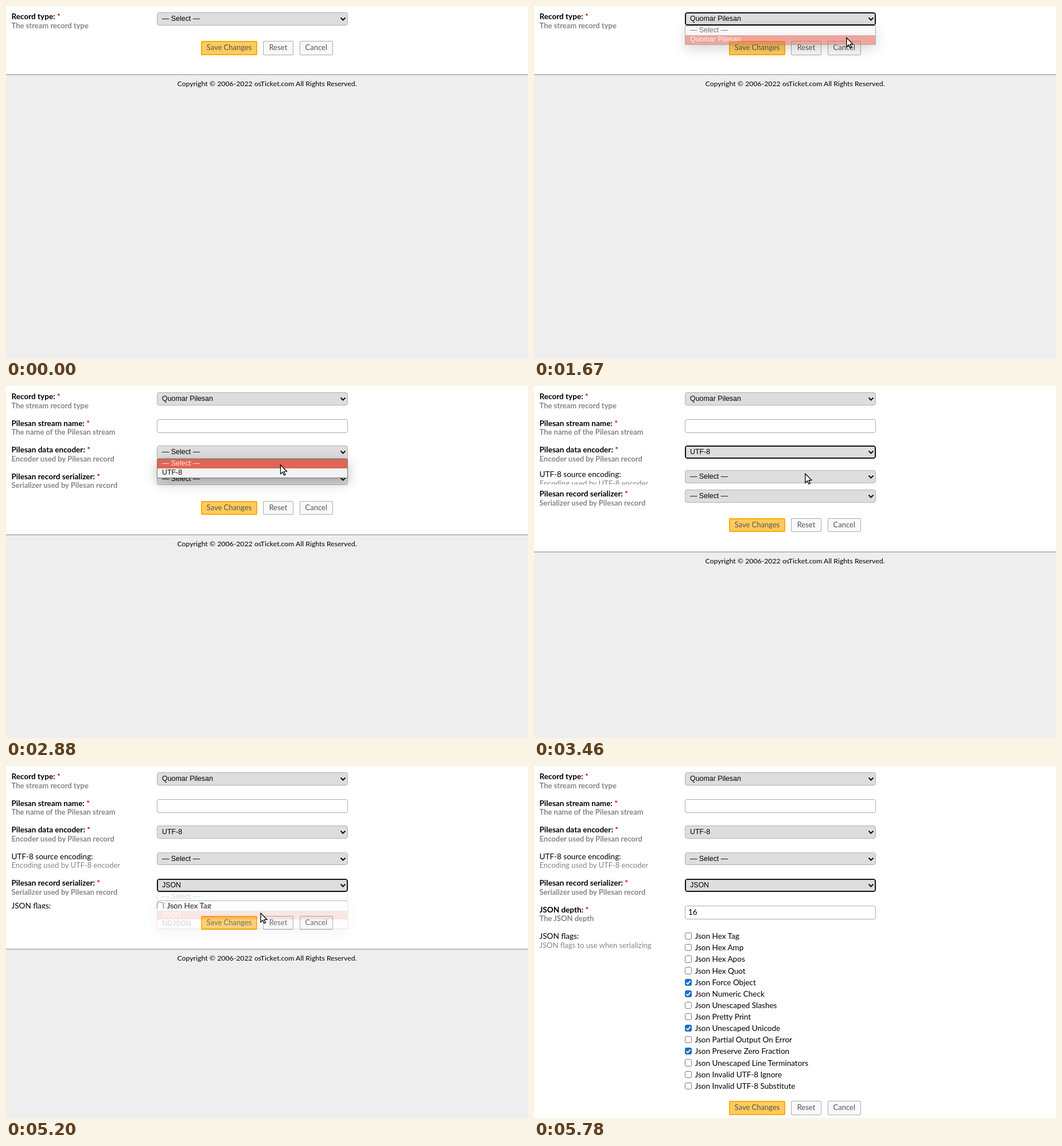
An HTML page that plays this animation: 910 px wide and 615 px high, repeating every 9.64 s.

```html
<!DOCTYPE html>
<html lang="en">
<head>
<meta charset="utf-8">
<title>Stream record form</title>
<style>
html, body { margin: 0; width: 100%; height: 100%; overflow: hidden; background: #eee; }
body { position: relative; font: 13.55px/16.4px Lato, sans-serif; color: #000; }
div, span, svg { position: absolute; box-sizing: border-box; white-space: nowrap; }
#form { left: 0; top: 0; width: 910px; background: #fff; }
.row { left: 0; width: 910px; overflow: hidden; }
.label { left: 9.5px; top: -1.3px; }
.label i { color: #d00; font-style: normal; }
.hint { left: 9.5px; top: 14.5px; font-size: 13px; color: #868686; }
.bold { font-weight: bold; }
.select, .input { left: 263px; width: 332.5px; border: 1px solid #aaa; border-radius: 4px; }
.select { top: -.3px; height: 22.8px; background: #ddd; border-color: #b2b2b2;
  font: 12.4px/21px "Liberation Sans", Arial, sans-serif; padding-left: 8px; }
.select.ring { border-color: #111; box-shadow: inset 0 0 0 1px #111; }
.select svg { left: 318px; top: 7px; }
.input { height: 24px; background: #fff; line-height: 21px; padding-left: 5px; }
.flag { left: 280.5px; line-height: 20.12px; }
.box { left: 263px; width: 12.2px; height: 12.2px; border: 1px solid #767676; border-radius: 2.5px; background: #fff; }
.box.on { background: #1f6fc0; border-color: #1f6fc0; }
.box svg { left: -1px; top: -1px; }
.button { height: 24.5px; font-size: 13px; line-height: 21.5px; text-align: center; color: #555;
  background: #f9f9f9; border: 1px solid #aaa; border-radius: 2px; }
.save { background: #ffcb5c; border: 2px solid #fa0; line-height: 19.5px; }
#foot { left: 0; width: 910px; height: 700px; background: #eee; border-top: 2px solid #bbb;
  text-align: center; font-size: 12.3px; line-height: 30.4px; }
.popup { left: 263px; width: 332.5px; background: #f3f3f3; border: 1px solid #777;
  box-shadow: 0 7px 22px rgba(0,0,0,.28); font: 12.4px/15.75px "Liberation Sans", Arial, sans-serif; }
.popup div { left: 0; width: 100%; height: 15.75px; padding-left: 8px; color: #111; }
.popup .hot { background: #e06557; color: #fff0dc; }
</style>
</head>
<body>
<div id="form"></div>
<div id="foot">Copyright © 2006-2022 osTicket.com All Rights Reserved.</div>
<div id="popups"></div>
<svg id="cursor" width="16" height="22" viewBox="-1 -1 16 22" style="left:-1px;top:-1px">
  <path d="M0 0V15.8L3.7 12.5L6.1 18L8.5 17L6.1 11.6L11 11.2Z" fill="#fff" stroke="#000" stroke-width="1.3"/>
</svg>
<script>
const LOOP = 9640, TOP = 2.2, PITCH = 46.5, PAD = 9.3, LINE = 15.75, FLAG = 20.12;
const NONE = '— Select —';
const $ = id => document.getElementById(id);
const clamp = (v, a = 0, b = 1) => Math.min(b, Math.max(a, v));

const flags = ['Hex Tag', 'Hex Amp', 'Hex Apos', 'Hex Quot', 'Force Object', 'Numeric Check',
  'Unescaped Slashes', 'Pretty Print', 'Unescaped Unicode', 'Partial Output On Error',
  'Preserve Zero Fraction', 'Unescaped Line Terminators', 'Invalid UTF-8 Ignore', 'Invalid UTF-8 Substitute'];
const checked = [4, 5, 8, 10];

const select = `<div class="select"><span>${NONE}</span><svg width="11" height="8">
  <path d="M1.5 1.5L5.5 5.5L9.5 1.5" fill="none" stroke="#111" stroke-width="2"/></svg></div>`;
const input = text => `<div class="input">${text}</div>`;
const tick = `<svg width="12.2" height="12.2"><path d="M2.6 6.3L5 8.8L9.7 3.4" fill="none" stroke="#fff" stroke-width="1.9"/></svg>`;
const flagList = flags.map((name, i) => {
  const on = checked.includes(i), y = i * FLAG;
  return `<div class="box ${on ? 'on' : ''}" style="top:${y + .6}px">${on ? tick : ''}</div>
    <div class="flag" style="top:${y - 3.3}px">Json ${name}</div>`;
}).join('');

// slides: start and length of each reveal
const always = [-1, 1], first = [1680, 290], second = [3360, 170], third = [5148, 400];
const rows = [
  ['Record type:', 'The stream record type', true, select, always],
  ['Pilesan stream name:', 'The name of the Pilesan stream', true, input(''), first],
  ['Pilesan data encoder:', 'Encoder used by Pilesan record', true, select, first],
  ['UTF-8 source encoding:', 'Encoding used by UTF-8 encoder', false, select, second],
  ['Pilesan record serializer:', 'Serializer used by Pilesan record', true, select, first],
  ['JSON depth:', 'The JSON depth', true, input('16'), third],
  ['JSON flags:', 'JSON flags to use when serializing', false, flagList, third, 291.5],
].map(([label, hint, must, field, slide, height = PITCH]) => {
  const el = document.createElement('div');
  el.className = 'row';
  const weight = must ? 'bold' : '';
  el.innerHTML = `<div style="left:0;width:910px"><div class="label ${weight}">${label}${must ? ' <i>*</i>' : ''}</div>
    <div class="hint ${weight}">${hint}</div>${field}</div>`;
  $('form').append(el);
  return { el, slide, height };
});

const buttons = [['Save Changes', 340, 98, 'save'], ['Reset', 448, 53, ''], ['Cancel', 511.5, 58.5, '']]
  .map(([text, x, w, cls]) => {
    const el = document.createElement('div');
    el.className = 'button ' + cls;
    el.textContent = text;
    el.style.left = x + 'px';
    el.style.width = w + 'px';
    $('form').append(el);
    return el;
  });

const popups = [
  { row: 0, opts: [NONE, 'Quomar Pilesan'], pick: 1, open: 570, close: 1620, fade: 120, blur: 2520 },
  { row: 2, opts: [NONE, 'UTF-8'], pick: 1, open: 2520, close: 3370, fade: 80, blur: 3950 },
  { row: 4, opts: [NONE, 'CSV', 'JSON', 'NDJSON'], pick: 2, open: 3950, close: 5050, fade: 180, blur: LOOP },
];
for (const p of popups) {
  p.top = TOP + PAD + PITCH * p.row + 22.6;
  p.el = document.createElement('div');
  p.el.className = 'popup';
  p.el.style.top = p.top + 'px';
  p.el.style.height = p.opts.length * LINE + 2 + 'px';
  p.el.innerHTML = p.opts.map((o, i) => `<div style="top:${i * LINE}px">${o}</div>`).join('');
  $('popups').append(p.el);
  p.select = rows[p.row].el.querySelector('.select');
}

// pointer path: time, x, y
const path = [[970, 561, 23], [1090, 557, 35], [1290, 549, 52], [1640, 549, 52], [1990, 502, 91],
  [2310, 486, 116], [2600, 486, 116], [3050, 474, 151], [3400, 474, 151], [3460, 473, 153], [3710, 456, 206],
  [4140, 456, 206], [4330, 444, 238], [4490, 443, 240], [4830, 444, 257], [5250, 444, 257], [5760, 430, 620]];

function pointer(t) {
  const i = path.findIndex(k => k[0] > t);
  if (i === 0) return path[0].slice(1);
  if (i < 0) return path[path.length - 1].slice(1);
  const [a, b] = [path[i - 1], path[i]], k = (t - a[0]) / (b[0] - a[0]);
  return [a[1] + (b[1] - a[1]) * k, a[2] + (b[2] - a[2]) * k];
}

function draw(t) {
  let y = TOP;
  for (const { el, slide, height } of rows) {
    const k = .5 - Math.cos(Math.PI * clamp((t - slide[0]) / slide[1])) / 2;
    el.style.top = y + 'px';
    el.style.height = height * k + 'px';
    el.firstChild.style.top = PAD * k + 'px';
    y += height * k;
  }
  for (const b of buttons) b.style.top = y + 12.7 + 'px';
  $('form').style.height = $('foot').style.top = y + 70.3 + 'px';

  const [px, py] = pointer(t);
  $('cursor').style.transform = `translate(${px}px,${py}px)`;
  $('cursor').style.visibility = t >= 570 && t < 5760 ? 'visible' : 'hidden';

  for (const p of popups) {
    const done = t >= p.close;
    const alpha = t < p.open ? 0 : done ? clamp(1 - (t - p.close) / p.fade) : t < p.open + 40 ? .6 : 1;
    const hot = done ? p.pick : clamp(Math.floor((py - p.top - 1) / LINE), 0, p.opts.length - 1);
    p.el.style.opacity = alpha;
    p.el.style.visibility = alpha ? 'visible' : 'hidden';
    [...p.el.children].forEach((o, i) => o.classList.toggle('hot', i === hot));
    p.select.firstChild.textContent = p.opts[done ? p.pick : 0];
    p.select.classList.toggle('ring', done && t < p.blur);
  }
}

function animate() {
  draw(performance.now() % LOOP);
  requestAnimationFrame(animate);
}
animate();
</script>
</body>
</html>
```
